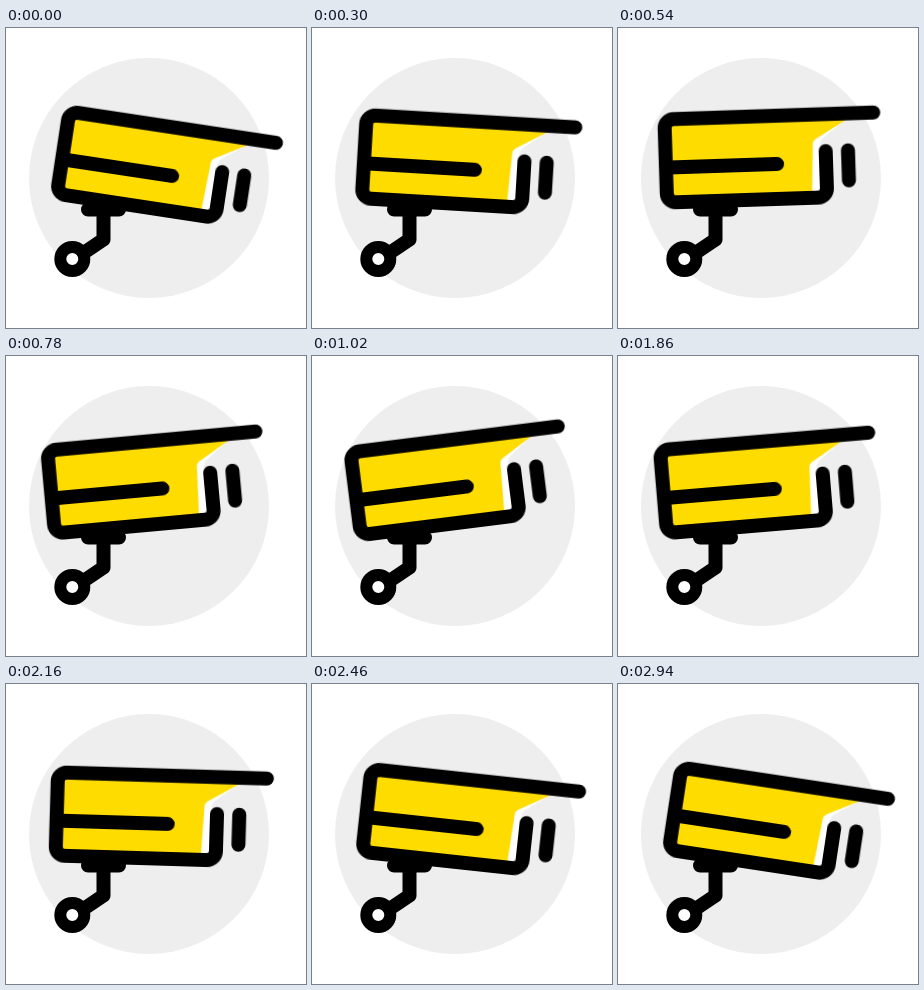
Recreate the animation shown at these times as an HTML page. Size 300 by 300 pixels, loop 2.97 s.

```html
<!DOCTYPE html>
<html lang="en">
<head>
<meta charset="utf-8">
<title>Security camera</title>
<style>
  html, body { margin: 0; width: 100%; height: 100%; overflow: hidden; background: #fff; }
  svg { display: block; width: 100vw; height: 100vh; }
  .line { fill: none; stroke: #000; stroke-width: 14; stroke-linecap: round; stroke-linejoin: round; }
  #head { transform-box: view-box; transform-origin: 0 0; }
</style>
</head>
<body>
<svg viewBox="0 0 300 300">
  <circle cx="143" cy="150" r="120" fill="#eee"/>

  <!-- Mount -->
  <path class="line" d="M82 181.5H113M97.5 181V211.5L76 226"/>
  <circle cx="66.3" cy="231" r="12" fill="#fff" stroke="#000" stroke-width="12"/>

  <!-- Head, drawn level around its pivot -->
  <g transform="translate(97.5 180)">
    <g id="head">
      <path fill="#fff" d="M90 -85H134L109 -66Q106 -63 106 -57V-10H90Z"/>
      <path fill="#ffdc00" d="M-44 -86H137L102 -65.5Q99.5 -64 99.3 -60L97 -11H-44Z"/>
      <path class="line" d="M160.8 -90.2H-39.2a9 9 0 0 0 -9 9V-16a9 9 0 0 0 9 9H103a9 9 0 0 0 9 -9V-53.3"/>
      <path class="line" d="M-47 -41.9H63M134.3 -53.3V-23.3"/>
    </g>
  </g>
</svg>
<script>
  const LOOP = 2970;
  const TURN = 1580;
  const SWING = 8.62;
  const pose = deg => `rotate(${deg}deg)`;

  document.getElementById('head').animate([
    { offset: 0, transform: pose(SWING), easing: 'cubic-bezier(.22,.1,.25,1)' },
    { offset: TURN / LOOP, transform: pose(-SWING), easing: 'cubic-bezier(.27,.1,.41,1)' },
    { offset: 1, transform: pose(SWING) }
  ], { duration: LOOP, iterations: Infinity });
</script>
</body>
</html>
```
